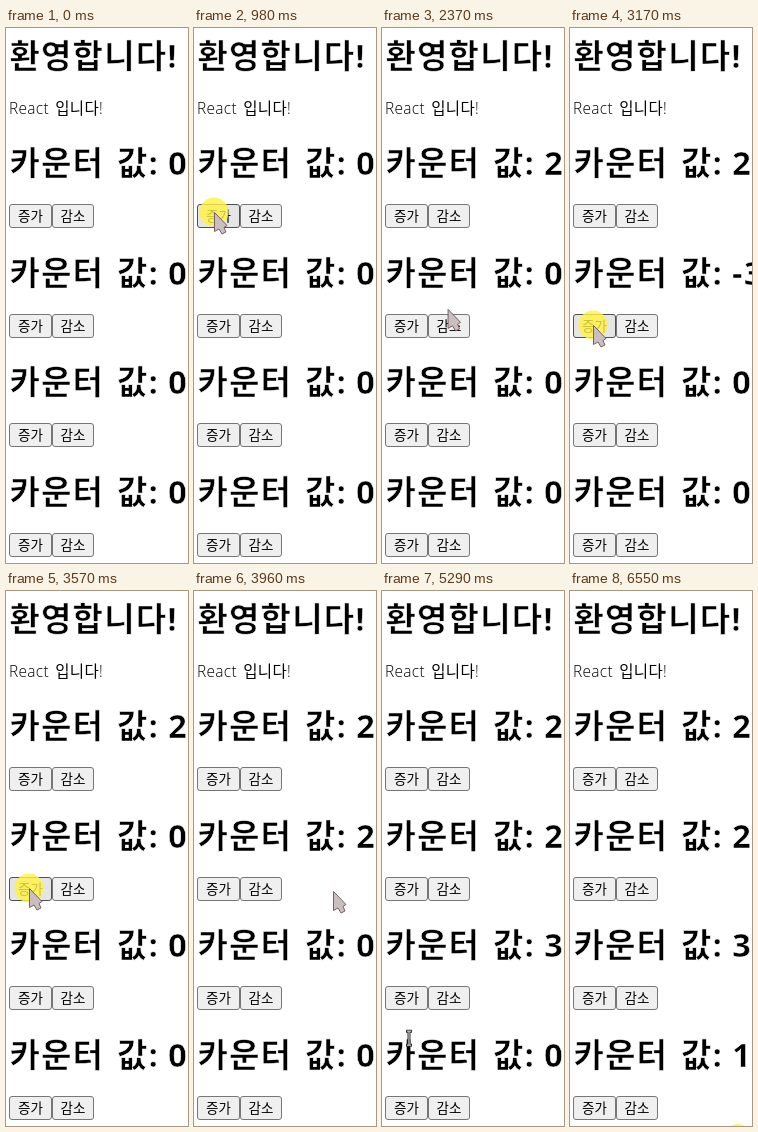
Recreate the animation shown at these times as an HTML page. Size 182 px wide and 535 px high, loop 7080 ms.

```html
<!DOCTYPE html>
<html lang="ko">
<head>
<meta charset="utf-8">
<title>카운터</title>
<style>
  html, body { margin: 0; width: 100%; height: 100%; overflow: hidden; background: #fff; }
  svg { display: block; width: 182px; height: 535px; }
  text { font-family: "Open Sans", "Noto Sans CJK KR", sans-serif; white-space: pre; }
  /* The thin white outline lightens the bold strokes */
  .title { font-size: 33px; font-weight: 700; letter-spacing: 1.2px; stroke: #fff; stroke-width: .6px; }
  .body { font-size: 15.5px; font-weight: 300; letter-spacing: .3px; word-spacing: 2px; }
  .label { font-size: 13.5px; font-weight: 300; text-anchor: middle; }
  .button { fill: #efefef; stroke: #767676; }
  .button.hover { fill: #e5e5e5; stroke: #4f4f4f; }
  #halo { fill: #fff340; fill-opacity: .8; }
  #arrow { fill: #c9bfc0; stroke: #7a6064; stroke-linejoin: round; }
  #beam path { fill: none; }
</style>
</head>
<body>
<svg viewBox="0 0 182 535">
  <text class="title" x="3.5" y="39.5">환영합니다!</text>
  <text class="body" x="3" y="85.5">React 입니다!</text>
  <g id="counters"></g>
  <circle id="halo" r="14.5"/>
  <g id="cursor">
    <path id="arrow" d="M.5 .5V19.5L5 17L8 22L12 20L10 15.5L13 13.5Z"/>
    <g id="beam">
      <path stroke="#333" stroke-width="3" d="M-3-6.5H3M0-6.5V7.5M-3 7.5H3"/>
      <path stroke="#ddd" d="M-2-6.5H2M0-6.5V7.5M-2 7.5H2"/>
    </g>
  </g>
</svg>
<script>
const LOOP = 7080, START = 380, TICK = 66.35, TRAVEL = 7;
const EXIT = 82, LAST_CLICK = 93;
const byId = id => document.getElementById(id);
const halo = byId('halo'), cursor = byId('cursor'), arrow = byId('arrow'), beam = byId('beam');

const rowTop = row => Math.round(row * 109.7);

const button = (x, width, label) => `
  <rect class="button" x="${x}" y="176.5" width="${width}" height="23" rx="2.5"/>
  <text class="label" x="${x + width / 2}" y="193">${label}</text>`;

byId('counters').innerHTML = [0, 1, 2, 3].map(row => `
  <g transform="translate(0 ${rowTop(row)})">
    <text class="title" x="3.5" y="146.5">카운터</text>
    <text class="title" x="111" y="146.5">값:</text>
    <text class="title value" x="162" y="146.5">0</text>
    ${button(3.5, 42, '증가')}${button(46.5, 41, '감소')}
  </g>`).join('');
const values = document.querySelectorAll('.value');
const buttons = document.querySelectorAll('.button');

// A point the pointer passes, and a series of clicks on a counter's button
const point = (tick, x, y) => ({ from: tick, until: tick, x, y, downs: [] });
const clicks = (row, change, first, count, gap = 2) => {
  const downs = Array.from({ length: count }, (_, i) => first + i * gap);
  return {
    row, change, downs, from: first, until: downs[count - 1],
    x: (change > 0 ? 20 : 63) + row * 3,
    y: rowTop(row) + 184 + row * 3
  };
};

const stops = [
  point(0, 60, 192),
  clicks(0, 1, 9, 3, 4),
  clicks(0, -1, 24, 1),
  clicks(1, -1, 31, 3),
  clicks(1, 1, 42, 5),
  point(54, 139, 300),
  point(61, 30, 446),
  clicks(2, 1, 68, 3),
  clicks(3, 1, 78, 1),
  point(EXIT, 30, 540)
];

function pointerAt(tick) {
  if (tick >= LAST_CLICK) return [168, 547.5];
  if (tick < 0 || tick >= EXIT) return [-50, -50];
  const next = stops.findIndex(stop => stop.from > tick);
  const a = stops[next - 1], b = stops[next];
  const span = Math.min(TRAVEL, b.from - a.until);
  const k = Math.min(1, Math.max(0, (tick - a.until) / span));
  return [a.x + (b.x - a.x) * k, a.y + (b.y - a.y) * k];
}

const show = (node, visible) => node.setAttribute('visibility', visible ? 'visible' : 'hidden');

function draw(time) {
  const tick = Math.floor((time % LOOP - START) / TICK + .08);
  const totals = [0, 0, 0, 0];
  for (const { row, change, downs } of stops) {
    totals[row] += change * downs.filter(down => down < tick).length;
  }
  values.forEach((value, i) => value.textContent = totals[i]);

  const [x, y] = pointerAt(tick);
  const place = `translate(${x} ${y})`;
  halo.setAttribute('transform', place);
  cursor.setAttribute('transform', place);
  show(halo, tick >= LAST_CLICK || stops.some(stop => stop.downs.includes(tick)));

  buttons.forEach((node, i) => {
    const dx = x - (i % 2 ? 67 : 24.5), dy = y - rowTop(i >> 1) - 188;
    node.classList.toggle('hover', Math.abs(dx) < 21 && Math.abs(dy) < 12);
  });

  const overText = x < 100 && [1, 2, 3].some(row => Math.abs(y - rowTop(row) - 134) < 18);
  show(arrow, !overText);
  show(beam, overText);
}

const begin = performance.now();
function frame() {
  draw(performance.now() - begin);
  requestAnimationFrame(frame);
}
frame();
</script>
</body>
</html>
```
